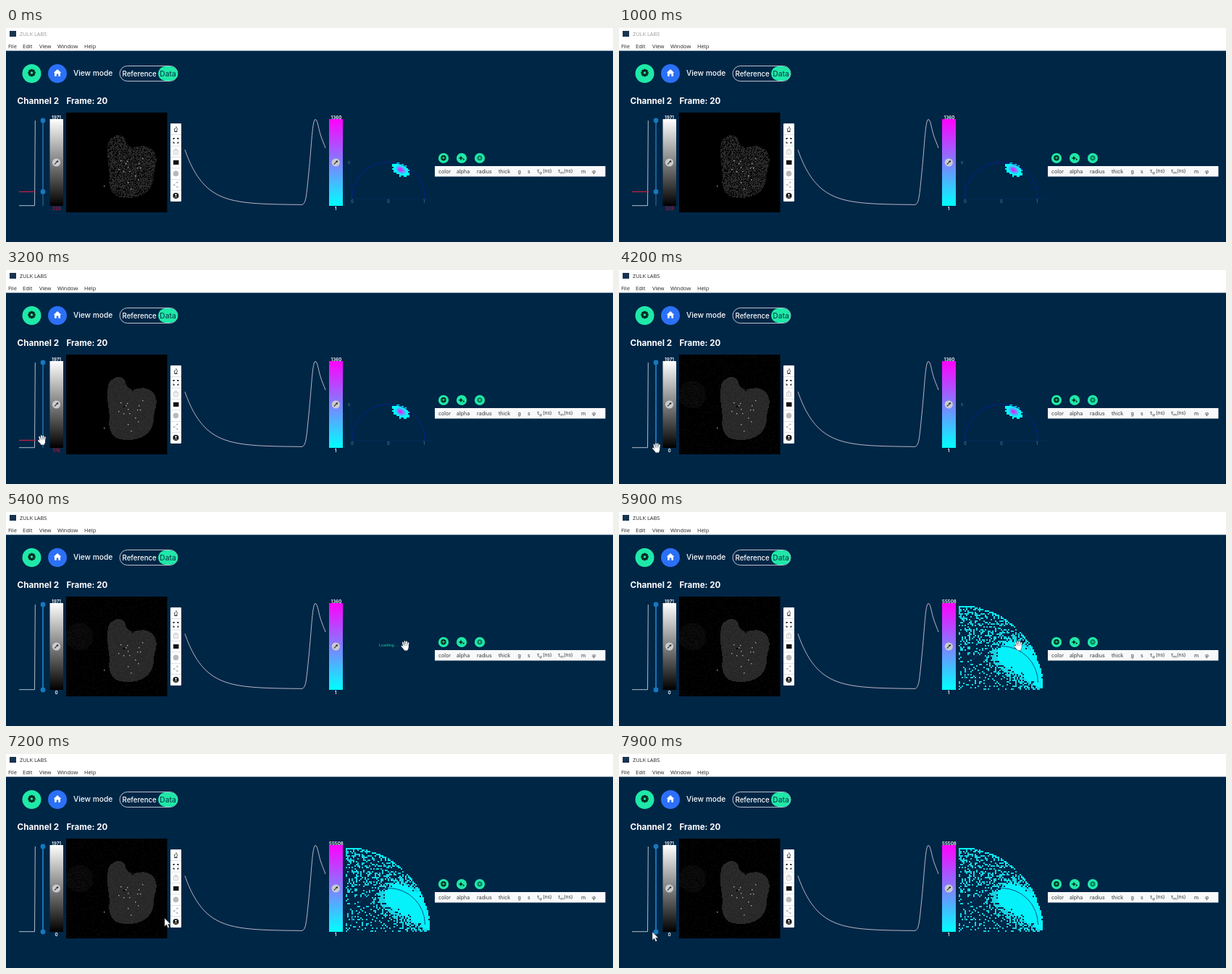
These frames come from a looping animation (838 px wide and 296 px high, 8000 ms). An HTML page with a canvas:

```html
<!DOCTYPE html>
<html lang="en">
<head>
<meta charset="utf-8">
<style>
html, body { margin: 0; width: 838px; height: 296px; overflow: hidden; background: #002646; }
canvas { display: block; }
</style>
</head>
<body>
<canvas id="stage" width="838" height="296"></canvas>
<script>
const W = 838, H = 296, LOOP = 8000, TAU = Math.PI * 2;
const GREEN = '#1fe9a8', BLUE = '#1678be', NAVY = '#002646', INK = '#06281f';
const UI = 'Inter, sans-serif', MENU = '"Open Sans", sans-serif', GREEK = '"Noto Sans", sans-serif';
const screen = document.getElementById('stage').getContext('2d');
let c = screen;

// ---- helpers ----
function random(seed) {
  return () => {
    seed = seed + 0x6D2B79F5 | 0;
    let n = Math.imul(seed ^ seed >>> 15, 1 | seed);
    n = n + Math.imul(n ^ n >>> 7, 61 | n) ^ n;
    return ((n ^ n >>> 14) >>> 0) / 4294967296;
  };
}
const clamp = (v, lo = 0, hi = 1) => Math.min(hi, Math.max(lo, v));
const ease = p => p * p * (3 - 2 * p);

function rect(x, y, w, h, color) { c.fillStyle = color; c.fillRect(x, y, w, h); }
function disc(x, y, r, color) {
  c.fillStyle = color;
  c.beginPath(); c.arc(x, y, r, 0, TAU); c.fill();
}
function line(points, color, width = 1) {
  c.strokeStyle = color; c.lineWidth = width;
  c.beginPath();
  points.forEach(([x, y]) => c.lineTo(x, y));
  c.stroke();
}
function fillPath(d, color) { c.fillStyle = color; c.fill(new Path2D(d)); }
function strokePath(d, color, width = 1) {
  c.strokeStyle = color; c.lineWidth = width; c.stroke(new Path2D(d));
}
function text(s, x, y, size, color, weight = 400, family = UI, align = 'left') {
  c.font = `${weight} ${size}px ${family}`;
  c.textAlign = align; c.fillStyle = color;
  c.fillText(s, x, y);
}
function layer(draw) {
  const canvas = document.createElement('canvas');
  canvas.width = W; canvas.height = H;
  const before = c;
  c = canvas.getContext('2d');
  draw();
  c = before;
  return canvas;
}
function at(x, y, draw) { c.save(); c.translate(x, y); draw(); c.restore(); }

// ---- icons ----
function gear(x, y, r, hole, color = INK) {
  at(x, y, () => {
    for (let i = 0; i < 4; i++) {
      rect(-r * .28, -r, r * .56, r * 2, color);
      c.rotate(Math.PI / 4);
    }
    disc(0, 0, r * .74, color);
    disc(0, 0, r * .34, hole);
  });
}
function dropper(x, y) {
  disc(x, y, 5.6, '#c9cbce');
  line([[x - 2.5, y + 2.5], [x + .6, y - .6]], '#444', 1.3);
  line([[x, y - 2], [x + 2, y]], '#333', 1);
  line([[x + .8, y - .8], [x + 2.4, y - 2.4]], '#333', 2);
}
function arrow(x, y) {
  at(x, y, () => {
    const d = 'M0 0V11.5L2.7 9L4.6 13.4L6.5 12.5L4.6 8.3H8.2Z';
    fillPath(d, '#fff');
    strokePath(d, '#333', .5);
  });
}
function hand(x, y) {
  at(x, y, () => {
    c.lineCap = c.lineJoin = 'round';
    const fingers = 'M-2.6 0L-3.6 -4.3M-.6 -1L-1 -6M1.4 -1L1.6 -5.6M3.3 0L4 -4M-2.5 3.5L-5 .6';
    const palm = 'M-3 -.5H4.2L4.2 3L2.8 6.5H-1.4L-3.5 3Z';
    strokePath(fingers, '#123', 2.7);
    strokePath(palm, '#123', 1);
    strokePath(fingers, '#fff', 1.7);
    fillPath(palm, '#fff');
  });
}

// ---- cell image ----
const outline = [[140,166],[142,155],[150,149],[158,147],[164,152],[166,160],[173,166],[182,164],
  [192,163],[201,167],[207,175],[208,186],[204,199],[204,211],[199,223],[189,231],[176,235],
  [160,235],[149,231],[144,223],[142,213],[143,203],[142,194],[140,180]];
const spots = [[167,184],[158,183],[183,187],[168,192],[185,193],[170,198],[162,198],[178,204],
  [182,209],[168,213],[172,222],[155,195],[188,180],[135,218],[165,187],[181,193]];

const cellPath = new Path2D();
outline.forEach(([x, y], i) => {
  const [px, py] = outline.at(i - 1), [nx, ny] = outline[(i + 1) % outline.length];
  if (!i) cellPath.moveTo((x + px) / 2, (y + py) / 2);
  cellPath.quadraticCurveTo(x, y, (x + nx) / 2, (y + ny) / 2);
});

const pixels = [];
const rnd = random(7);
for (let y = 117; y < 255; y++) for (let x = 83; x < 222; x++) {
  const n = rnd();
  let count = n > .9 ? 40 : 0;
  if (screen.isPointInPath(cellPath, x + .5, y + .5)) count = 205 + n * 340;
  else if (Math.hypot(x - 101, y - 172) < 19) count = n * 80;
  if (count) pixels.push([x, y, count]);
}
function drawCells(threshold) {
  rect(83, 117, 139.5, 138, '#000');
  for (const [x, y, count] of pixels) {
    if (count <= threshold) continue;
    const g = Math.round(48 * (1 - Math.exp(-count / 180)));
    rect(x, y, 1, 1, `rgb(${g},${g},${g})`);
  }
  disc(163, 189, 1.3, '#050505');
  disc(175, 166, 1.5, '#050505');
  for (const [x, y] of spots) rect(x, y, 1.4, 1.4, '#aaa');
}
let cells, cellsThreshold = -1;
function cellImage(threshold) {
  if (threshold !== cellsThreshold) {
    cells = layer(() => drawCells(threshold));
    cellsThreshold = threshold;
  }
  return cells;
}

// ---- phasor clouds ----
const smallCloud = layer(() => {
  const r = random(3);
  for (let y = 186; y < 208; y += 2) for (let x = 531; x < 559; x += 2) {
    const dx = x + 1 - 545, dy = y + 1 - 196;
    const u = (dx * .86 + dy * .5) / 13, v = (dy * .86 - dx * .5) / 8.5;
    const d = Math.hypot(u, v);
    if (d > .82 + r() * .3) continue;
    const k = clamp(1.15 - d * 1.7) * (.7 + r() * .3);
    rect(x, y, 2, 2, `rgb(${255 * k | 0},${255 * (1 - k) | 0},255)`);
  }
});
const largeCloud = layer(() => {
  const r = random(11);
  for (let y = 128; y < 245; y += 2) for (let x = 469; x < 586; x += 2) {
    const n = r(), radius = Math.hypot(x - 468, y - 245);
    if (radius > 117) continue;
    // distance from the ridge of the cloud
    const s = clamp(((x - 540) * 42 + (y - 196) * 26) / 2440);
    const d = Math.hypot(x - 540 - s * 42, y - 196 - s * 26);
    const floor = y > 195 && x < 535 ? .16 : .28;
    const density = radius > 115 ? .85 : clamp(1.45 - d / 29, floor, 1);
    if (n < density) rect(x, y, 2, 2, density > .8 ? '#05f2fb' : '#16d3e2');
  }
});

// ---- fixed parts ----
const backdrop = layer(() => {
  rect(0, 0, W, H, NAVY);
  rect(0, 0, W, 31.5, '#fff');
  rect(5, 4, 9, 8, '#17344f');
  [['File', 3], ['Edit', 23], ['View', 46], ['Window', 71], ['Help', 108]]
    .forEach(([s, x]) => text(s, x, 28, 7.5, '#222', 400, MENU));

  disc(35.5, 63, 13, GREEN);
  gear(35.5, 62, 5.2, GREEN);
  disc(71, 63, 13, '#2b70f7');
  fillPath('M71 57L76.3 62H75V66.7H72.3V63.4H69.7V66.7H67V62H65.7Z', '#fff');
  text('View mode', 93, 66.3, 10.2, '#fff', 500);
  c.beginPath(); c.roundRect(157, 52.5, 80, 21, 10.5);
  c.strokeStyle = '#e8eef4'; c.lineWidth = .8; c.stroke();
  c.beginPath(); c.roundRect(210, 53, 27, 20, 10);
  c.fillStyle = GREEN; c.fill();
  text('Reference', 160.5, 66.6, 9.7, '#fff', 500);
  text('Data', 212.3, 66.6, 10.2, '#0b4a50', 500);
  text('Channel 2', 15.5, 104.5, 11.7, '#fff', 700);
  text('Frame: 20', 83.5, 104.5, 11.5, '#fff', 700);

  line([[18, 245.7], [39.5, 245.7], [40.3, 128]], '#dfe4ea', .8);

  const gray = c.createLinearGradient(0, 126, 0, 246);
  gray.addColorStop(0, '#fff'); gray.addColorStop(1, '#000');
  rect(60.5, 126, 18.5, 120, gray);
  dropper(69.5, 186);
  text('1971', 69.5, 125.5, 6.3, '#fff', 600, UI, 'center');

  drawToolbar();

  // decay curve
  const decay = [];
  for (let x = 247; x <= 405; x++) decay.push([x, 244.5 - 76 * Math.exp((247 - x) / 26.6)]);
  line(decay, '#f3e4ee', .75);
  strokePath('M405 244.4C414 245.5 414 240 418 200C422 160 423 127 427 126.5C430 126.5 431 137 434 147C436 154 439 160 441 166', '#f3e4ee', .75);

  const hot = c.createLinearGradient(0, 126, 0, 246);
  hot.addColorStop(0, '#f0f'); hot.addColorStop(1, '#0ff');
  rect(446, 126, 19, 120, hot);
  dropper(455.3, 186);
  text('1', 455, 251.5, 6.3, '#fff', 600, UI, 'center');

  drawTable();
});

function drawToolbar() {
  c.beginPath(); c.roundRect(227, 132, 15, 108, 1);
  c.fillStyle = '#fff'; c.fill();
  for (let i = 1; i < 7; i++) rect(227, 132 + i * 15.4, 15, .6, '#ccc');
  strokePath('M234.5 136L236.5 139.5L235.5 143H233L232.3 139.5L234.5 138.5M232.3 143.5H236.700', '#222', .8);
  strokePath('M231.2 154V152.7H233M236 152.7H237.8V154M231.2 157.5V159H233M236 159H237.8V157.5', '#111', 1.2);
  strokePath('M231.5 169.5H237.5V174.5H231.5ZM233 169V167.5H236V169M233 172H236', '#bbb', .8);
  rect(231, 183, 7.5, 6, '#111');
  disc(234.5, 201.4, 3.8, '#b9b9b9');
  line([[236.5, 213.5], [232, 217], [236.5, 220]], '#ccc', .7);
  [[236.5, 213.5], [232, 217], [236.5, 220]].forEach(([x, y]) => disc(x, y, 1.1, '#aaa'));
  disc(234.5, 232, 4, '#111');
  disc(234.5, 230.8, 1.2, '#fff');
  strokePath('M232.5 234.3Q234.5 232.3 236.5 234.3', '#fff', .9);
}

function drawTable() {
  [604, 629, 654].forEach(x => disc(x, 180, 7.1, GREEN));
  disc(604, 179.7, 3.7, INK);
  line([[602, 179.7], [606, 179.7]], GREEN, .9);
  line([[604, 177.7], [604, 181.7]], GREEN, .9);
  fillPath('M628 176.5L629 179L631.5 180L629 181L628 183.5L627 181L624.5 180L627 179Z', INK);
  disc(631.7, 181.8, 1.1, INK);
  gear(654, 179.8, 3.7, GREEN, '#0c7f62');
  rect(592, 191, 235.5, 14.5, '#f8f9fa');
  [['color', 597], ['alpha', 622], ['radius', 650], ['thick', 680], ['g', 706.5], ['s', 720],
   ['m', 794], ['φ', 809]].forEach(([s, x]) => text(s, x, 200.7, 7.1, '#333'));
  [['φ', 733], ['m', 762]].forEach(([sub, x]) => {
    text('τ', x, 200, 7, '#333', 400, GREEK);
    text(sub, x + 3.3, 201.7, 5, '#333', 400, GREEK);
    text('(ns)', x + 8, 199.7, 6.8, '#333');
  });
}

function drawPhasor(t) {
  if (t >= 4900 && t < 5900) {
    text('Loading...', 515, 186, 5.4, '#22cfa0');
    return;
  }
  const loaded = t >= 5900;
  if (!loaded) {
    line([[477, 236], [590, 236]], '#08305a', .7);
    line([[477, 183], [477, 236]], '#08305a', .7);
    [['0', 478, 241.5], ['0', 528, 241.5], ['1', 577, 241.5], ['s', 473.5, 188]]
      .forEach(([s, x, y]) => text(s, x, y, 5.5, '#6b809b', 400, UI, 'center'));
  }
  c.drawImage(loaded ? largeCloud : smallCloud, 0, 0);
  c.beginPath(); c.arc(528, 236, 50.5, Math.PI, TAU);
  c.strokeStyle = loaded ? '#0a3c78' : '#06209a';
  c.lineWidth = .9; c.stroke();
}

// ---- pointer: time, x, y ----
const track = [[1500, -12, 262], [2000, 48, 226], [2750, 48, 226], [3700, 52, 246], [4750, 52, 246],
  [5250, 551.5, 185], [5950, 551.5, 185], [6350, 540, 192], [6750, 540, 192], [7500, 46, 246], [8000, 46, 246]];
function drawPointer(t) {
  const i = track.findIndex(k => k[0] > t);
  if (i < 1) return;
  const [t0, x0, y0] = track[i - 1], [t1, x1, y1] = track[i];
  const p = ease((t - t0) / (t1 - t0));
  const shape = t >= 1950 && t < 5950 ? hand : arrow;
  shape(x0 + (x1 - x0) * p, y0 + (y1 - y0) * p);
}

function drawThreshold(value) {
  const y = 246 - 19.5 * value / 328;
  if (value > 0) line([[18, y], [41, y]], '#c81f3c', 1.2);
  line([[51, 128], [51, 246]], '#4a7fa8', .8);
  line([[51, 128], [51, y]], BLUE, value > 0 ? 1 : 1.8);
  disc(51, 128, 3.4, BLUE);
  disc(51, y, 3.4, BLUE);
  text(String(value), 69.7, 251.7, 6.3, value > 0 ? '#b51234' : '#fff', 600, UI, 'center');
}

function frame(t) {
  const threshold = Math.round(328 * (1 - ease(clamp((t - 2750) / 950))));
  c.drawImage(backdrop, 0, 0);
  text('ZULK LABS', 19, 11, 7.4, t < 2750 ? '#999' : '#222', 400, MENU);
  drawThreshold(threshold);
  c.drawImage(cellImage(threshold), 0, 0);
  text(t < 5900 ? '1360' : '55508', 456, 125.5, 6.3, '#fff', 600, UI, 'center');
  drawPhasor(t);
  drawPointer(t);
}

const start = performance.now();
(function tick() {
  frame((performance.now() - start) % LOOP);
  requestAnimationFrame(tick);
})();
</script>
</body>
</html>
```
